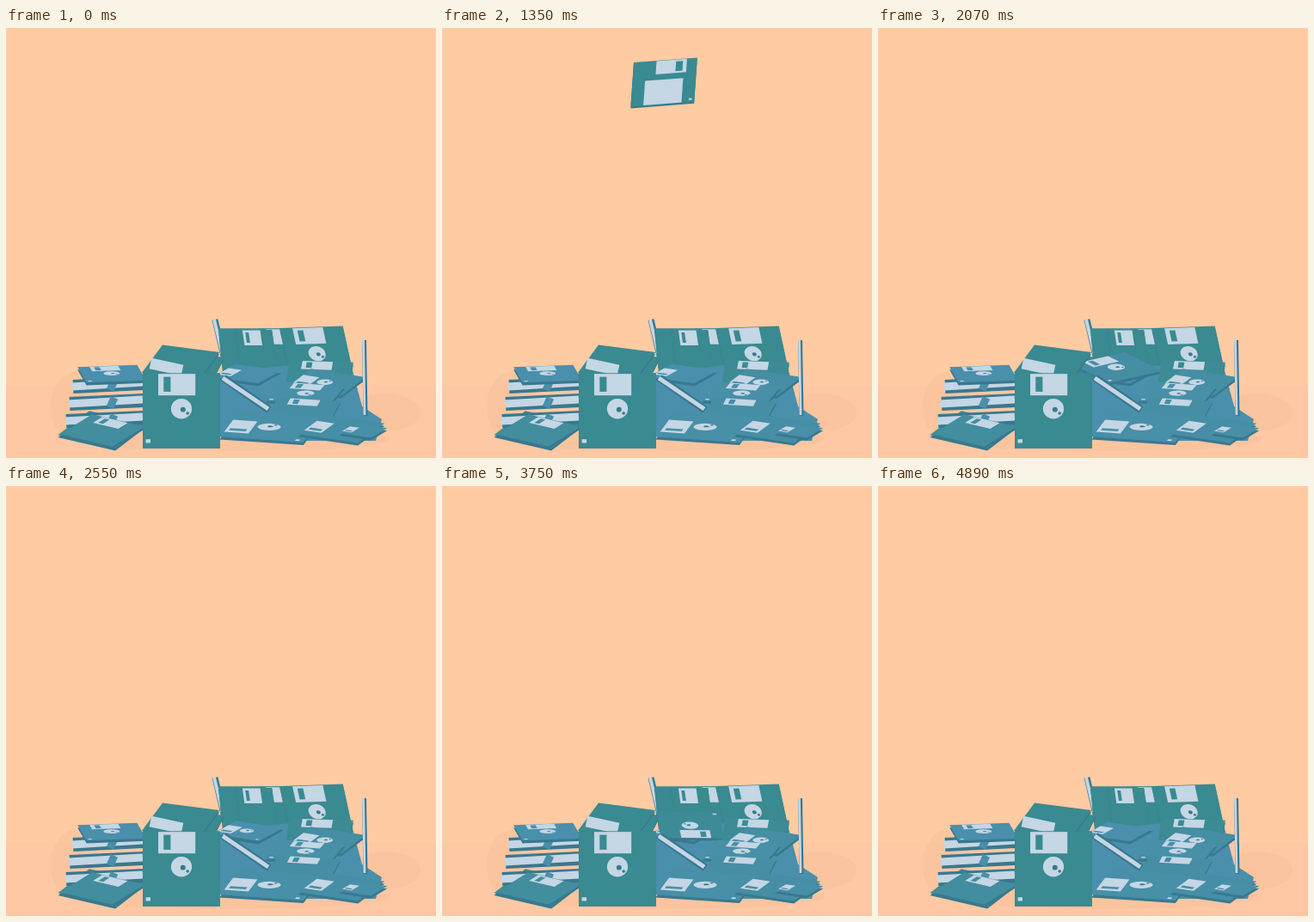
Write an HTML page with a canvas that moves like this. It is 500 px wide and 500 px high and loops after 4920 ms.

```html
<!DOCTYPE html>
<html lang="en">
<head>
<meta charset="utf-8">
<title>Falling disk</title>
<style>
html, body { margin: 0; width: 100%; height: 100%; overflow: hidden; background: #ffcba3; }
canvas { display: block; width: 100vw; height: 100vh; }
</style>
</head>
<body>
<canvas id="stage" width="500" height="500"></canvas>
<script>
const ctx = document.getElementById('stage').getContext('2d');
const LOOP = 4920, STEP = 30, DROP = 1200, LANDING = 1560, REST = 4890;
const PEACH = '#ffcba3', SHADOW = 'rgba(240,190,150,.35)', EDGE = '#39788f',
  BLUE = '#4a8fab', TEAL = '#398a91', PALE = '#c5d6e4';

const clamp = v => Math.min(1, Math.max(0, v));
const mix = (a, b, k) => a + (b - a) * k;
const smooth = k => k * k * (3 - 2 * k);

function rect(color, x, y, w, h) {
  ctx.fillStyle = color;
  ctx.fillRect(x, y, w, h);
}

function oval(color, x, y, rx, ry = rx) {
  ctx.fillStyle = color;
  ctx.beginPath();
  ctx.ellipse(x, y, rx, ry, 0, 0, Math.PI * 2);
  ctx.fill();
}

function line(color, width, x1, y1, x2, y2) {
  ctx.strokeStyle = color;
  ctx.lineWidth = width;
  ctx.beginPath();
  ctx.moveTo(x1, y1);
  ctx.lineTo(x2, y2);
  ctx.stroke();
}

// Flat disks catch blue light, upright ones look teal.
function bodyColor(tilt) {
  const k = clamp((tilt - .28) / .2);
  return `rgb(${mix(74, 57, k)},${mix(143, 138, k)},${mix(171, 145, k)})`;
}

// Details are drawn on a unit square centred on the disk.
const faces = {
  blank() {},
  shutter(color) {
    rect(PALE, -.3, -.49, .48, .29);
    rect(color, -.23, -.45, .09, .2);
  },
  back(color) {
    faces.shutter(color);
    oval(PALE, 0, -.02, .135);
    oval(EDGE, .02, -.01, .033);
    oval(EDGE, .08, .04, .02);
    rect(PALE, -.46, .39, .06, .05);
  },
  front(color) {
    rect(PALE, -.14, -.49, .48, .3);
    rect(color, .17, -.45, .11, .22);
    rect(PALE, -.3, -.06, .6, .55);
    rect(PALE, .41, .41, .05, .04);
  }
};

// tilt: 1 faces the viewer, 0 lies flat; lean shifts the lower side.
function disk({ x, y, size, turn = 0, tilt, lean = 0, face = 'back' }) {
  const color = bodyColor(tilt), depth = 1 + 3 * (1 - clamp(tilt));
  const place = dy => {
    ctx.transform(1, 0, lean, tilt, x, y + dy);
    ctx.rotate(turn);
    ctx.scale(size, size);
  };
  ctx.save();
  place(depth);
  rect(EDGE, -.5, -.5, 1, 1);
  ctx.restore();
  ctx.save();
  place(0);
  rect(color, -.5, -.5, 1, 1);
  faces[face](color);
  ctx.restore();
}

// A disk seen from its side.
function sliver(x1, y1, x2, y2, width) {
  line(EDGE, width, x1, y1, x2, y2);
  line(PALE, width * .55, x1 - 1, y1, x2 - 1, y2 - 1);
}

function background() {
  rect(PEACH, 0, 0, 500, 500);
  rect('rgba(252,197,164,.5)', 0, 415, 500, 85);
  oval(SHADOW, 440, 447, 42, 22);
  oval(SHADOW, 80, 440, 28, 40);
  oval(SHADOW, 260, 478, 185, 14);
}

function backRow() {
  sliver(243, 339, 255, 390, 7);
  disk({ x: 288, y: 379, size: 76, tilt: .78, lean: .08, face: 'blank' });
  disk({ x: 317, y: 380, size: 42, tilt: 1.45, lean: .1, face: 'shutter' });
  disk({ x: 292, y: 381, size: 43, tilt: 1.4, lean: .2, face: 'shutter' });
  disk({ x: 362, y: 380, size: 74, turn: -.04, tilt: .87, lean: .15 });
  disk({ x: 232, y: 390, size: 34, turn: .3, tilt: .6, face: 'blank' });
}

function mound() {
  ctx.fillStyle = BLUE;
  ctx.beginPath();
  [[240, 402], [330, 392], [404, 402], [414, 440], [437, 455], [430, 480], [288, 480], [248, 474]]
    .forEach(p => ctx.lineTo(...p));
  ctx.fill();
}

const flat = (x, y, size, turn = -1.2, tilt = .3, face = 'back') =>
  disk({ x, y, size, turn, tilt, face });

function rightSlope() {
  flat(364, 404, 74, .08, .45, 'shutter');
  flat(372, 412, 70, -1.15, .34);
  flat(348, 425, 76, .25);
  flat(346, 444, 74, .18, .34, 'shutter');
  sliver(416.5, 363, 418, 451, 5);
  flat(308, 464, 100, -1.35);
  flat(390, 466, 76, -1.15, .33, 'shutter');
  flat(415, 468, 42, -1.1, .3, 'shutter');
  sliver(253, 407, 306, 444, 9);
}

function leftStack() {
  flat(112, 467, 76, .5, .42, 'shutter');
  for (let i = 2; i >= 0; i--) {
    const x = 78 - 4 * i, y = 417 + 20 * i;
    sliver(x, y, 160, y - 4, 16);
    line(BLUE, 9, 126, y - 7, 121, y + 4);
  }
  flat(112, 468, 72, .55, .38, 'shutter');
  flat(123, 402, 70, -.15, .26);
}

function frontLeft() {
  disk({ x: 203, y: 389, size: 70, turn: .25, tilt: .48, lean: -.1, face: 'blank' });
  line(PALE, 13, 168, 390, 205, 398);
  disk({ x: 204, y: 444.5, size: 90, tilt: .96 });
}

const resting = { x: 280, y: 402, size: 60, turn: -1.1, tilt: .28, face: 'shutter' };

// Key poses after the landing; the disk turns once and sinks into the pile.
const poses = [
  { at: 1620, x: 275, y: 389, size: 88, turn: -.08, tilt: .4, lean: .1 },
  { at: 2550, x: 281, y: 401, size: 62, turn: -1.1, tilt: .28, lean: 0 },
  { at: 3360, x: 287, y: 397, size: 80, turn: 1.57, tilt: .34, lean: 0 },
  { at: 4230, x: 290, y: 390, size: 62, turn: 5.33, tilt: .54, lean: .25 },
  { at: REST, ...resting, turn: resting.turn + 2 * Math.PI, lean: 0 }
];

function falling(t) {
  const s = (t - DROP) / 1000;
  return {
    x: 224 + 227 * s, y: -36 + 288 * s + 2480 * s * s, size: 73,
    turn: -.11 + .8 * (s - .15), tilt: .71, lean: -.16, face: 'front'
  };
}

function settling(t) {
  const next = poses.findIndex(p => p.at > t);
  if (next < 1) return poses[0];
  const a = poses[next - 1], b = poses[next], k = smooth((t - a.at) / (b.at - a.at));
  const pose = {};
  for (const key of ['x', 'y', 'size', 'turn', 'tilt', 'lean']) pose[key] = mix(a[key], b[key], k);
  return pose;
}

function draw(time) {
  const t = Math.floor((time % LOOP) / STEP) * STEP;
  const moving = t >= DROP && t < REST, onTop = t > 1700;
  const drawMoving = () => disk(t < LANDING ? falling(t) : settling(t));
  background();
  backRow();
  mound();
  if (moving && !onTop) drawMoving();
  disk(resting);
  if (moving && onTop) drawMoving();
  rightSlope();
  leftStack();
  frontLeft();
}

const start = performance.now();
function tick() {
  draw(performance.now() - start);
  requestAnimationFrame(tick);
}
tick();
</script>
</body>
</html>
```
